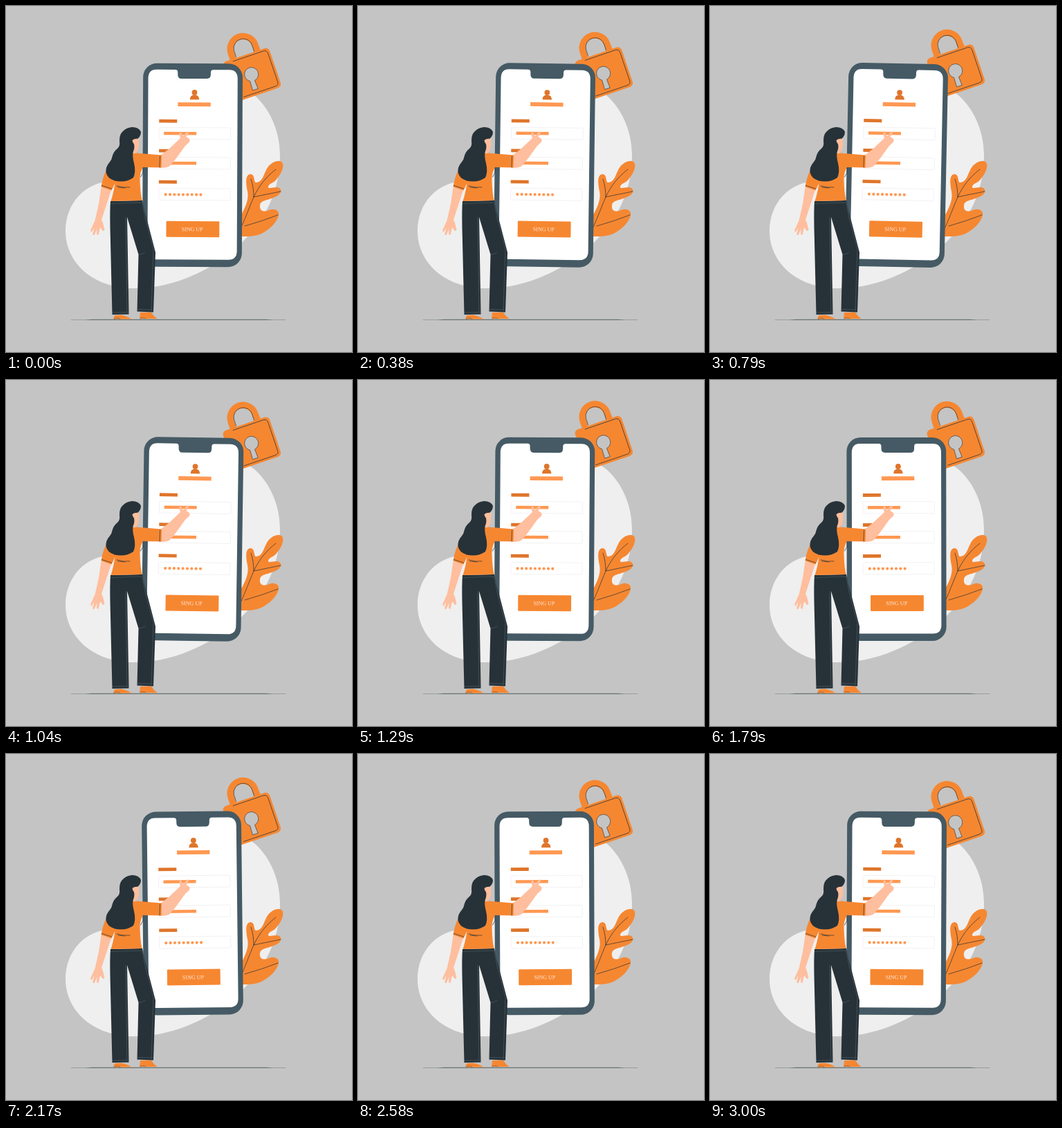
An HTML page for the animation above (3040 ms loop, 500 by 500 pixels).

```html
<!DOCTYPE html>
<html lang="en">
<head>
<meta charset="utf-8">
<title>Sign-up illustration</title>
<style>
  html, body { margin: 0; height: 100%; overflow: hidden; background: #c4c4c4; }
  svg { display: block; width: 100%; height: 100%; }
  .orange { fill: #f68731; }
  .dark { fill: #263238; }
  .skin { fill: #ffbe9d; }
  .line { fill: none; stroke: #263238; stroke-width: .7; stroke-linecap: round; stroke-linejoin: round; }
  .seam { fill: none; stroke: #53636b; stroke-width: .6; }
  .bar { fill: #ff9852; }
  .label { fill: #df752b; }
  .field { fill: #fff; stroke: #ececec; stroke-width: .7; }
  text { font: 8px "Liberation Serif", "Times New Roman", serif; fill: #ffe9da; text-anchor: middle; }
</style>
</head>
<body>
<svg viewBox="0 0 500 500">
  <path fill="#efefef" d="M300 118C350 98 396 155 396 215C396 300 340 350 293 378C260 396 225 408 185 408C125 408 86 370 86 325C86 285 115 253 155 253C200 250 220 180 300 118Z"/>

  <path d="M94 453.5H404" stroke="#6b7174" stroke-width=".5"/>
  <path d="M114 453.4L124 452.7H376L386 453.4L376 454.1H124Z" fill="#66736f"/>

  <g id="leaf">
    <path class="orange" d="M330 333V310L341 300C347 288 351 279 349 268C347 258 345 244 353 243C361 243 357 256 362 255C371 254 372 244 377 235C382 226 394 221 399 226C403 232 397 243 392 249C388 256 380 256 379 261C378 266 389 260 395 263C400 267 396 273 389 276C379 281 368 280 367 288C366 297 373 298 380 295C387 292 395 295 394 302C392 312 382 322 371 328C361 333 351 333 341 333Z"/>
    <path class="line" d="M337 326C346 307 351 292 358 276C366 259 376 247 390 236M358 276Q358 262 354 250M358 276Q377 272 397 268M345 318Q370 311 393 302"/>
  </g>

  <g id="lock">
    <path d="M329 78L325 66A18.2 18.2 0 0 1 360 55L365 68" fill="none" stroke="#f68731" stroke-width="9.3"/>
    <path class="line" d="M332.5 72L329.5 63A13.7 13.7 0 0 1 356 56L358.5 64"/>
    <g transform="translate(312 80.5) rotate(-18.7)">
      <rect class="orange" width="71" height="60.5" rx="6"/>
      <path class="line" d="M16 3.2H62Q67.5 3.2 67.5 9V52Q67.5 57 62 57H14"/>
    </g>
    <path d="M352.5 107A10 10 0 1 1 359.5 106L364.2 118L356.5 120.5Z" fill="#c4c4c4" stroke="#4f4a45" stroke-width=".8"/>
  </g>

  <g id="phone">
    <rect x="197.6" y="83" width="143.8" height="294" rx="20" fill="#455a64"/>
    <path fill="#fff" d="M217 92H244Q247.7 92 247.7 96V99Q247.7 105 253 105H290Q295.3 105 295.3 99V96Q295.3 92 299 92H322Q334.2 92 334.2 105V354Q334.2 366.5 322 366.5H217Q205 366.5 205 354V105Q205 92 217 92Z"/>
    <g class="label">
      <circle cx="272" cy="125" r="3.9"/>
      <path d="M265.3 135.3Q265.3 128.4 272 128.4T278.9 135.3Z"/>
    </g>
    <rect class="bar" x="248" y="139.3" width="47.4" height="5.8"/>
    <g id="form"></g>
    <rect class="orange" x="231.9" y="311" width="76.8" height="23" rx="1"/>
    <text x="269.5" y="325.3">SING UP</text>
  </g>

  <g id="woman">
    <path class="skin" d="M137.5 262L134 286L128.500 310L122 324.500L123.500 327L128 320L125 330L127.500 331.500L131.500 322L131 330L133.500 331L136 320L140 325L142.500 324L140 313L138 309L152 266Z"/>
    <path class="skin" d="M222 217L236 206L252 191L250 184Q251.500 181.500 253 183L256 188L261.500 181.800Q264.300 181 264 183.500L260.500 189L265 192Q266.500 195 264 197.500L259 202L246 220L237 231Q234 234 223 234Z"/>
    <path class="skin" d="M180 190H191.500L192 200L191 207Q190 211 187 210L189 215L178 216Z"/>
    <path class="orange" d="M157 447L166 446.500Q175 448 181.500 452.500H155Z"/>
    <path class="orange" d="M194 443L210 442.500Q213 448 218.500 452H193Z"/>
    <path class="line" stroke-opacity=".6" d="M156 452Q160 449.500 165 452M194 451.500Q198 449.500 202 451.500"/>
    <path class="dark" d="M151 282L197 281Q199 295 204 310L216 356L213 442.500L189.500 441.500L191.500 359L175 305L177.500 445.500L153.500 446L150.500 320Q150 295 151 282Z"/>
    <path class="seam" d="M151.500 285.500L197 284M173 305L175 442M197 285L201 306L213 351L210 440M154 443L177 442.500M190 438.500L212 439"/>
    <path class="seam" d="M192 359Q197 359 201 356"/>
    <path class="orange" d="M186 213Q190 212 194 213L225 215.500L224.500 233.500L198 233Q193 241 193.500 252Q194 270 196.500 281L151.500 282Q155 272 157.500 256L152.500 266.500L137.500 261.500Q140 244 148 232Q160 215 186 213Z"/>
    <path class="line" d="M222.500 217L222 233M198 234V241L194.500 247M160 260Q169 263 179 262M162 262L172 263M138.500 259.500L152.500 264"/>
    <path class="dark" d="M170 180Q174 176 182 175Q192 175 195 182Q195 188 190 192Q184 193 184 197Q187 203 184 210Q182 216 185 227Q188 240 184 248Q173 256 157 252.500Q146 249 144.500 240Q144 232 149.500 226Q153 222 154 216Q156 210 161 206Q165 203 164 195Q163.500 185 170 180Z"/>
    <path class="skin" d="M182.500 194Q186 191 191.500 192V200Q189 200 187 199.500Q183 199 182.500 194Z"/>
  </g>
</svg>
<script>
const $ = id => document.getElementById(id);
const rect = (type, x, y, w, h) =>
  `<rect class="${type}" x="${x}" y="${y}" width="${w}" height="${h}"/>`;

// Three labelled fields: two filled with bars, the last with password dots.
$('form').innerHTML = [164, 207, 252].map((y, i) =>
  rect('label', 221, y, 26, 4.8) +
  `<rect class="field" x="221" y="${y + 11.7}" width="103.4" height="17" rx="1"/>` +
  (i < 2
    ? rect('bar', 228, y + 18, 47, 4.5)
    : Array.from({ length: 9 }, (_, k) =>
        `<circle class="bar" cx="${230.8 + k * 6.35}" cy="272.6" r="2.1"/>`).join(''))
).join('');

const LOOP = 3040, CYCLE = 2960;
const ease = p => (1 - Math.cos(Math.PI * p)) / 2;
const swing = [0, 1, 0, -1, 0];

function draw(now) {
  const p = Math.min(now % LOOP / CYCLE, 1);
  const k = Math.min(Math.floor(p * 4), 3);
  const tilt = swing[k] + (swing[k + 1] - swing[k]) * ease(p * 4 - k);
  $('phone').setAttribute('transform', `rotate(${0.25 + 0.9 * tilt} 270 230)`);
  $('lock').setAttribute('transform', `translate(0 ${1.5 - 9.2 * ease(p * 2)})`);
  requestAnimationFrame(draw);
}
draw(performance.now());
</script>
</body>
</html>
```
